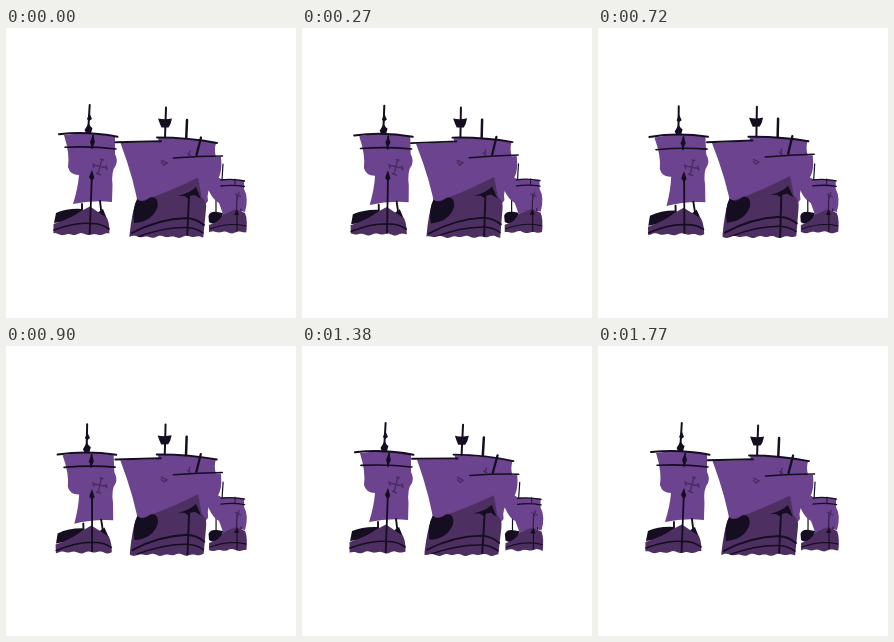
Recreate the animation shown at these times as an HTML page. Size 290 by 290 pixels, loop 1800 ms.

```html
<!DOCTYPE html>
<html lang="en">
<head>
<meta charset="utf-8">
<title>Three ships</title>
<style>
html, body { margin: 0; width: 100%; height: 100%; overflow: hidden; background: #fff; }
svg { display: block; width: 100vw; height: 100vh; }
.sail { fill: #6b438e; }
.hull { fill: #4e2f61; }
.dark { fill: #150d20; }
.line { fill: none; stroke: #150d20; stroke-linecap: round; }
.cross { fill: none; stroke: #4a2b64; stroke-width: 1.4; }
.water { fill: #fff; }
</style>
</head>
<body>
<svg viewBox="0 0 290 290">
  <g id="small">
    <path class="line" stroke-width="1.2" d="M217 136L216 152M210 170V187"/>
    <path class="sail" d="M202 140L202.500 162Q207 172 213 175L217 186Q229 181 239 184Q243 170 238 161L238 152L215 151Q207 147 202 140Z"/>
    <path class="line" stroke-width="1.3" d="M215 152Q227 150.500 238.500 153M215 158Q227 156.500 238.500 158.500"/>
    <path class="line" stroke-width=".8" d="M229 151V157M231 167L230.500 185M235 181V186"/>
    <path class="cross" d="M229 166L235 169M233 164L231 172"/>
    <path class="dark" d="M202.500 188Q204 183 211 184L217 185L215 193Q207 198 203 194Z"/>
    <path class="hull" d="M203 197Q214 194 217 186L230 181L239 185Q242 191 240 208H203Z"/>
    <path class="line" stroke-width="1.100" d="M231 184V208M204 201Q223 194 240 198"/>
    <path class="dark" d="M228 187L231 181L233 187Z"/>
  </g>
  <g id="left">
    <path class="line" stroke-width="2" d="M83.700 77L82 106"/>
    <path class="dark" d="M83.500 85L86 91L83 93L81 91ZM82.500 95L85 99L86.500 100L85 105H80L78.500 102L81 98Z"/>
    <path class="sail" d="M58 107Q83 103 109 109L109 126Q112 132 110 137Q105 143 106.500 157L106 174Q86 172 67 176Q72 160 73 147Q64 147 62 139Q64 126 58 107Z"/>
    <path class="line" stroke-width="2" d="M53 106.200Q82 103 111.500 108.700"/>
    <path class="line" stroke-width="1.600" d="M59 119.300Q85 118 110 121"/>
    <path class="line" stroke-width="1.900" d="M87 108L86 120M76 176V184M94 173L96 190"/>
    <path class="dark" d="M87 107L89 114L86 120L84 114Z"/>
    <path class="cross" d="M88 137L101 140M96 131L92 146M87 135L88 140M100 137L101 142M94 131L98 132M90 145L95 147"/>
    <path class="dark" d="M50 185Q62 180 76 181L77 187Q66 193 48 195ZM91 185L97 181L101 191L94 190Z"/>
    <path class="hull" d="M47.500 196Q64 191 75 183L84 178.500L101 190Q104.500 197 103 211H47.500Z"/>
    <path class="line" stroke-width="1.600" d="M48 202Q70 194 84 195.500Q95 195 103 201"/>
    <path class="line" stroke-width="1.800" d="M86 145L83.500 210"/>
    <path class="dark" d="M86 142L88.300 150L85.500 153L83 149Z"/>
  </g>
  <g id="big">
    <path class="line" stroke-width="2" d="M160 79.500L159 110"/>
    <path class="line" stroke-width="2.500" d="M181 92L180 116"/>
    <path class="dark" d="M152 90.500Q159 92 166 90.500L164.500 96L162.500 99.500H155.500L154 96Z"/>
    <path class="sail" d="M114.500 115L153 114L152 110Q184 110 210 115Q208 122 210 129L215 129Q217 149 208 155Q200 162 202 173L198 178L133 183Q129 154 114.500 115Z"/>
    <path class="line" stroke-width="1.900" d="M109.500 114.300L155 113.300M151 109.500Q183 109.500 211 115"/>
    <path class="line" stroke-width="1.500" d="M167.500 130Q193 128 216.500 128"/>
    <path class="line" stroke-width="2.300" d="M195 109.500L190.500 127"/>
    <path class="cross" d="M155 132L161 135L158 137L155 134M181 125L185 128M184 122L183 128"/>
    <path class="hull" d="M123.500 207Q126 184 130 174Q152 169 192 149.500L195.500 169Q201 174 200 181L197 212H123.500Z"/>
    <path class="dark" d="M131 171Q137 176 144 169.500Q153 168 151.500 179Q146 194 128 195Q126 181 131 171ZM172 168Q184 165 190 159L195 171L189 167L184 168L183 171L178 168Z"/>
    <path class="line" stroke-width="1.900" d="M183 168L181 212M126 205Q152 191 181 190Q191 191 198 197"/>
    <path class="line" stroke-width="1.500" d="M131 209Q158 199 181 199.500Q190 200 197 205"/>
  </g>
  <path id="water" class="water"/>
</svg>
<script>
const LOOP = 1800;
const TAU = Math.PI * 2;
// Each ship rolls around its pivot and heaves; peaks are times in ms.
const ships = [
  { id: "left", x: 81, y: 143, tilt: -1.45, rollPeak: 700, heave: .8, heavePeak: 700 },
  { id: "big", x: 162, y: 146, tilt: -1.08, rollPeak: 500, heave: .6, heavePeak: 100 },
  { id: "small", x: 222, y: 173, tilt: -.3, drift: -.5, rollPeak: 430, heave: .3, heavePeak: 1300 }
];
for (const ship of ships) ship.node = document.getElementById(ship.id);
const water = document.getElementById("water");

const wave = (t, peak) => Math.cos(TAU * (t - peak) / LOOP);
const swing = (t, peak) => wave(t, peak) - wave(0, peak);

function waterLevel(x, phase) {
  const level = x < 112 ? 206.3 : x < 200.5 ? 208.8 : 204.2;
  return level + Math.sin(x * .48 + phase) * .7 + Math.sin(x * .23 - phase) * .5;
}

function render(t) {
  for (const { node, x, y, tilt, drift = 0, rollPeak, heave, heavePeak } of ships) {
    const roll = swing(t, rollPeak);
    const lift = heave * swing(t, heavePeak);
    node.setAttribute("transform", `translate(${drift * roll} ${lift}) rotate(${tilt * roll} ${x} ${y})`);
  }
  const phase = TAU * t / LOOP;
  let d = "M40 220";
  for (let x = 40; x <= 248; x++) d += `L${x} ${waterLevel(x, phase).toFixed(2)}`;
  water.setAttribute("d", d + "V220Z");
}

const start = performance.now();
function tick() {
  render((performance.now() - start) % LOOP);
  requestAnimationFrame(tick);
}
render(0);
requestAnimationFrame(tick);
</script>
</body>
</html>
```
